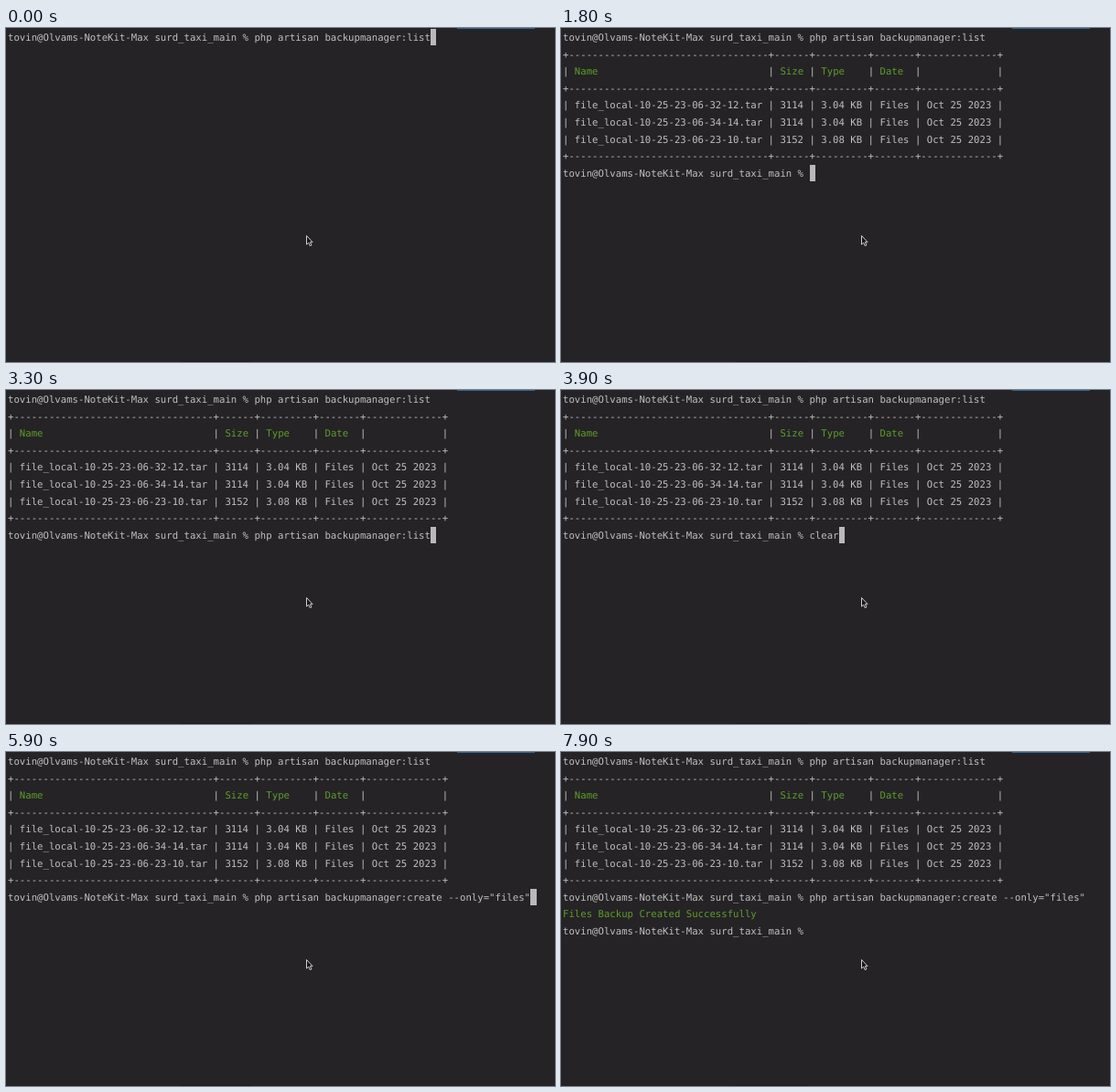
Write an HTML page that moves like this. It is 600 by 366 pixels and loops after 8 s.

```html
<!DOCTYPE html>
<html lang="en">
<head>
<meta charset="utf-8">
<title>Terminal</title>
<style>
  html, body { margin: 0; width: 100%; height: 100%; overflow: hidden; background: #252325; }
  #stage { position: relative; width: 600px; height: 366px; overflow: hidden; background: #252325; }
  #screen {
    position: absolute; left: 2px; top: 2.1px; margin: 0;
    font: 10.66px/18.6px "DejaVu Sans Mono", "Noto Sans Mono", monospace;
    color: #c0c0c0; white-space: pre;
    text-rendering: geometricPrecision; font-variant-ligatures: none;
  }
  .line { position: absolute; left: 0; height: 18.6px; }
  .line b { font-weight: 400; color: #5c9e2c; }
  #cursor { position: absolute; width: 6.4px; height: 18.6px; margin-top: -1.3px; background: #b9b9b9; }
  #tab { position: absolute; left: 493px; top: 0; width: 85px; height: 1px; background: #2f6593; }
  #edge { position: absolute; left: 190px; top: 365px; width: 79px; height: 1px; background: #1c1a1c; }
  #pointer { position: absolute; left: 327px; top: 226px; }
</style>
</head>
<body>
<div id="stage">
  <div id="tab"></div>
  <div id="edge"></div>
  <div id="screen"></div>
  <svg id="pointer" width="12" height="16" viewBox="0 0 12 16">
    <path d="M1.5 1.6V11.2L3.7 9.3L5.2 12.7L6.9 12L5.4 8.7H8.1Z"
          fill="#151515" stroke="#d0d0d0" stroke-width="1" stroke-linejoin="round"/>
  </svg>
</div>
<script>
const LOOP = 8000, CHAR = 6.417, ROW = 18.6;
const screen = document.getElementById('screen');

const prompt = 'tovin@Olvams-NoteKit-Max surd_taxi_main % ';
const list = 'php artisan backupmanager:list';
const create = 'php artisan backupmanager:create --only="files"';

const widths = [32, 4, 7, 5, 11];
const rule = '+' + widths.map(w => '-'.repeat(w + 2) + '+').join('');
const row = cells => '|' + cells.map((c, i) => ` ${c.padEnd(widths[i])} |`).join('');
const file = (stamp, bytes, size) =>
  row([`file_local-10-25-23-06-${stamp}.tar`, bytes, size, 'Files', 'Oct 25 2023']);
const green = text => text.replace(/[A-Za-z]+( [A-Za-z]+)*/g, '<b>$&</b>');

const listed = [
  prompt + list, rule, green(row(['Name', 'Size', 'Type', 'Date', ''])), rule,
  file('32-12', '3114', '3.04 KB'),
  file('34-14', '3114', '3.04 KB'),
  file('23-10', '3152', '3.08 KB'),
  rule
];
const created = [...listed, prompt + create];
const done = [...created, green('Files Backup Created Successfully')];

// [start ms, finished lines, current line, cursor visible]
const timeline = [
  [0, [], prompt + list, true],
  [300, [], prompt + list, false],
  [800, [], prompt + list, true],
  [1300, [prompt + list], '', true],
  [1700, listed, '', true],
  [1800, listed, prompt, true],
  [2300, listed, prompt, false],
  [2900, listed, prompt, true],
  [3300, listed, prompt + list, true],
  [3800, listed, prompt + 'clear', true],
  [4900, listed, prompt + list, true],
  [5900, listed, prompt + create, true],
  [6400, listed, prompt + create, false],
  [6900, listed, prompt + create, true],
  [7200, created, '', true],
  [7300, done, '', true],
  [7400, done, prompt, true],
  [7900, done, prompt, false]
];

function render([, lines, current, cursorOn]) {
  const html = [...lines, current]
    .map((text, i) => `<div class="line" style="top:${i * ROW}px">${text}</div>`);
  if (cursorOn) {
    html.push(`<div id="cursor" style="left:${current.length * CHAR}px;top:${lines.length * ROW}px"></div>`);
  }
  screen.innerHTML = html.join('');
}

let shown;
const start = performance.now();
function tick() {
  const time = (performance.now() - start) % LOOP;
  const state = timeline.findLast(s => s[0] <= time);
  if (state !== shown) render(shown = state);
  requestAnimationFrame(tick);
}
tick();
</script>
</body>
</html>
```
